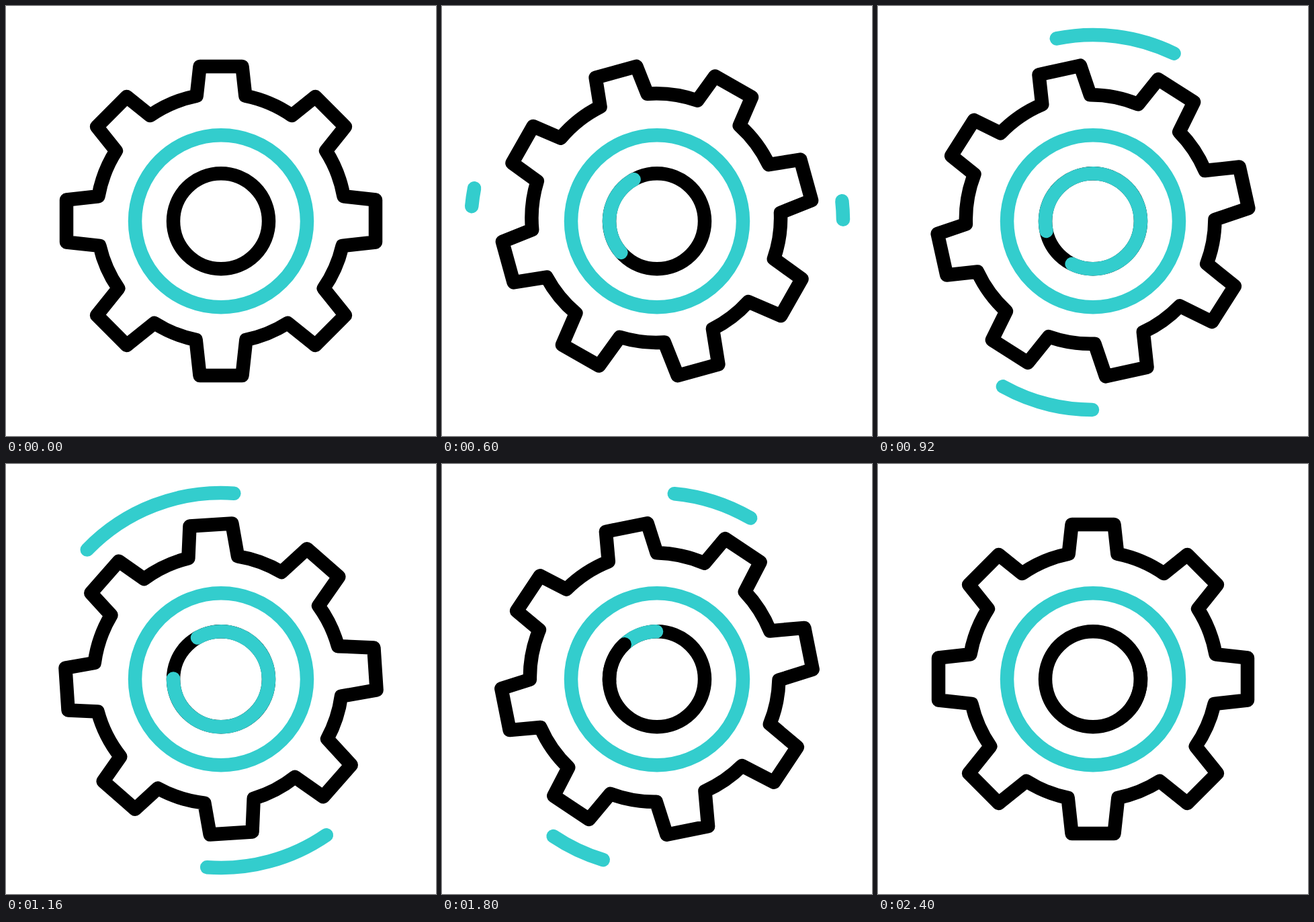
These frames come from a looping animation (640x640 px, 2480 ms). An HTML page:

```html
<!DOCTYPE html>
<html lang="en">
<head>
<meta charset="utf-8">
<title>Turning gear</title>
<style>
  html, body { margin: 0; height: 100%; overflow: hidden; background: #fff; }
  svg { display: block; width: 100vw; height: 100vh; }
  svg * { fill: none; stroke: #000; stroke-width: 20.5; stroke-linecap: round; stroke-linejoin: round; }
  svg .accent { stroke: #33cdcd; }
</style>
</head>
<body>
<svg viewBox="0 0 640 640">
  <path id="upper" class="accent"/>
  <path id="lower" class="accent"/>
  <path id="gear"/>
  <circle class="accent" cx="320" cy="320.3" r="128"/>
  <circle cx="320" cy="320.3" r="71"/>
  <path id="sweep" class="accent"/>
  <path id="cover"/>
</svg>
<script>
const LOOP = 2480, MOVE = 2400;
const setPath = (id, d) => document.getElementById(id).setAttribute('d', d);
const rad = deg => deg * Math.PI / 180;

const progress = (t, from, to) => Math.min(1, Math.max(0, (t - from) / (to - from)));
const easeInOut = x => (1 - Math.cos(Math.PI * x)) / 2;

// Eight teeth on a rim that sits slightly above the hub
function gearPath() {
  let d = '';
  for (let angle = 0; angle < 360; angle += 45) {
    const at = (x, depth) => {
      const c = Math.cos(rad(angle)), s = Math.sin(rad(angle));
      return (x * c + depth * s).toFixed(2) + ' ' + (x * s - depth * c).toFixed(2);
    };
    const foot = side => {
      const depth = 181.6 + 4.8 * Math.cos(rad(angle + side * 11.5));
      return at(side * (31.5 + 0.11 * (230 - depth)), depth);
    };
    d += (d ? 'A185 185 0 0 1 ' : 'M') + foot(-1)
      + 'L' + at(-31.5, 230) + 'L' + at(31.5, 230) + 'L' + foot(1);
  }
  return d + 'A185 185 0 0 1 ' + d.slice(1, d.indexOf('L')) + 'Z';
}

// Arc between two angles, in degrees clockwise from the top
function setArc(id, cy, r, from, to) {
  const point = deg =>
    (320 + r * Math.sin(rad(deg))).toFixed(2) + ' ' + (cy - r * Math.cos(rad(deg))).toFixed(2);
  const large = to - from > 180 ? 1 : 0;
  setPath(id, to - from > 0.3 ? `M${point(from)}A${r} ${r} 0 ${large} 1 ${point(to)}` : '');
}

// The gear swings anticlockwise and back, a little past the middle of the loop
const turn = t => 107.8 * Math.sin(Math.PI * progress(t, 0, MOVE) ** 1.245) ** 3.08;

// The outer arcs run out and return; the tail starts later and goes less far
const arcHead = t => 136 * (easeInOut(progress(t, 518, 1126)) - progress(t, 1268, 2055) ** 2.5);
const arcTail = t => 86 * (easeInOut(progress(t, 577, 1095)) - progress(t, 1184, 2051) ** 3.5);

// The inner sweep runs once round a slowly turning base
const base = t => 216.2 + 39.2 * (t / 1000) ** 2.2;
const sweepHead = t => base(t) + 360 * easeInOut(progress(t, 328, 1092));
const sweepTail = t => base(t) + 360 * progress(t, 813, 1881) ** 1.6;

const gear = document.getElementById('gear');
setPath('gear', gearPath());

function draw(t) {
  gear.setAttribute('transform', `translate(320 320) rotate(${-turn(t)})`);

  const head = arcHead(t), tail = arcTail(t);
  setArc('upper', 320, 277, 90 - head, 90 - tail);
  setArc('lower', 324, 277, -78.5 - head, -78.5 - tail * 1.13);

  const start = sweepTail(t), end = sweepHead(t);
  setArc('sweep', 320.3, 71, start, end);
  setArc('cover', 320.3, 71, start - 50, t > 1640 ? start : start - 50);
}

function tick() {
  draw(performance.now() % LOOP);
  requestAnimationFrame(tick);
}
tick();
</script>
</body>
</html>
```
